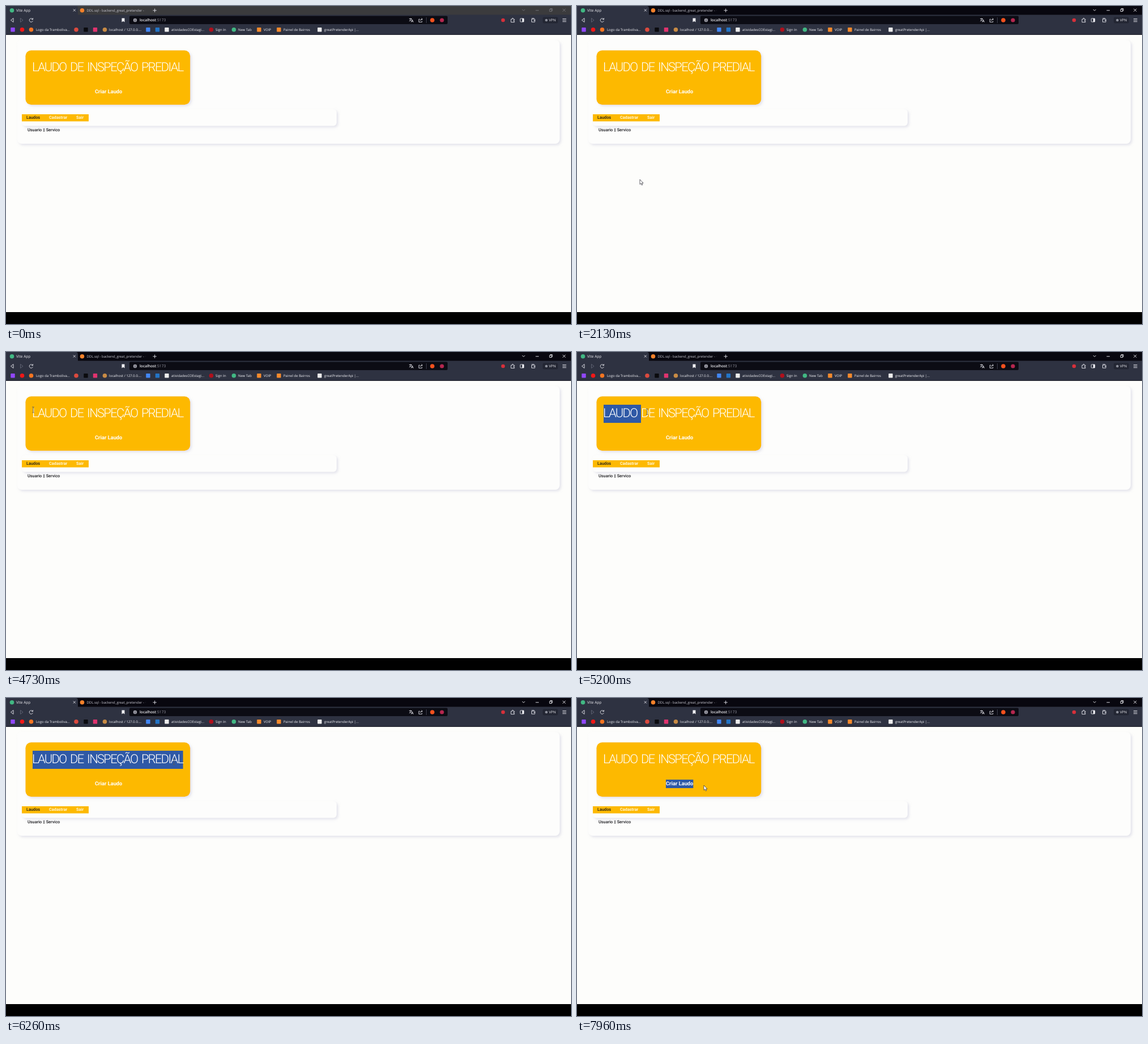
These frames come from a looping animation (998x561 px, 8000 ms). An HTML page:

```html
<!DOCTYPE html>
<html lang="pt">
<head>
<meta charset="utf-8">
<title>Vite App</title>
<style>
  html, body { margin: 0; width: 100%; height: 100%; overflow: hidden; background: #fdfdfb; }
  svg { display: block; width: 100vw; height: 100vh; }
  text { white-space: pre; text-rendering: geometricPrecision; }
  .ui { font-family: "Open Sans", "Noto Sans", sans-serif; font-size: 6px; fill: #f1f1f5; }
  .page { font-family: Roboto, "Noto Sans", sans-serif; font-size: 7.35px; fill: #17171b; font-weight: 500; }
  .page .title { font-size: 22px; font-weight: 300; letter-spacing: -1.75px; word-spacing: 3px; fill: #fff; }
  .page .create { font-size: 9.3px; font-weight: 600; fill: #fff; }
  .page .light { fill: #fff6dc; font-weight: 600; }
  .line { fill: none; stroke: #e6e6ec; stroke-width: .9; }
</style>
</head>
<body>
<svg viewBox="0 0 998 561" preserveAspectRatio="none">
  <defs>
    <filter id="soft" x="-10%" y="-20%" width="120%" height="150%">
      <feDropShadow dx="2.5" dy="2.5" stdDeviation="2" flood-color="#c9c9dc" flood-opacity=".5"/>
    </filter>
  </defs>

  <rect width="998" height="561" fill="#fdfdfb"/>

  <g class="page">
    <rect x="20" y="60" width="958" height="183" rx="8" fill="#fdfdfc" filter="url(#soft)"/>
    <rect x="34.4" y="78.3" width="291" height="96" rx="10" fill="#fdb902" filter="url(#soft)"/>
    <rect x="28" y="182" width="556" height="29.5" rx="6" fill="#fdfdfc" filter="url(#soft)"/>
    <rect x="28" y="191" width="118" height="12.5" fill="#fdb902"/>
    <rect id="selTitle" x="47" y="93" height="32" fill="#2f59a6"/>
    <rect id="selCreate" x="157" y="144" height="15" fill="#2f59a6"/>
    <text id="title" class="title" x="46" y="114.5">LAUDO DE INSPEÇÃO PREDIAL</text>
    <text id="create" class="create" x="157" y="154.3">Criar Laudo</text>
    <text x="36" y="199.4">Laudos</text>
    <text class="light" x="76" y="199.4">Cadastrar</text>
    <text class="light" x="124" y="199.4">Sair</text>
    <text x="38" y="221">Usuario <tspan font-weight="700">||</tspan> Servico</text>
  </g>

  <g class="ui">
    <rect id="strip" width="998" height="16"/>
    <path d="M0 0H123Q127 0 127 4V16H0Z" fill="#2e3241"/>
    <rect y="15.5" width="998" height="35.5" fill="#2e3241"/>
    <rect y="50" width="998" height="1" fill="#1b1d27"/>
    <rect x="218" y="17.5" width="562" height="14.5" rx="2" fill="#0c0c14"/>

    <text x="18" y="10" font-size="6.5">Vite App</text>
    <text x="142.5" y="10" fill="#c9c9d2">DDL.sql - backend_great_pretender - <tspan fill="#55555f">·</tspan></text>
    <path class="line" d="M118.8 5.5l4 4m0-4l-4 4M259.5 7.8h6.4m-3.2-3.2v6.4"/>

    <path class="line" d="M13 21.5L8.5 25l4.5 3.5Z"/>
    <path class="line" d="M25.5 21.5L30 25l-4.5 3.5Z" style="stroke:#626676"/>
    <path class="line" d="M47 23.2A3.2 3.2 0 1 0 47.4 26.3M47.6 21.3v2.4h-2.5"/>
    <path d="M204.5 21.5h5v7l-2.5-1.8-2.5 1.8Z" fill="#f1f1f5"/>
    <circle cx="228" cy="25" r="3.2" fill="#9c9ca6"/>
    <path d="M228 23v.9m0 .7v2.3" stroke="#22222c" stroke-width=".9"/>
    <text x="236" y="27.3" font-size="6.7" font-weight="600">localhost<tspan fill="#9a9aa5" font-weight="400">:5173</tspan></text>

    <path class="line" d="M712 22.5h5m-2.5-1v1m1.8 0q-1 3-4 4.3m1-2.6q1 1.6 2 2M715.8 28.5l1.8-4.5 1.8 4.5m-3-1.4h2.4"/>
    <path class="line" d="M731 23.3h-1.8v5h5.6v-1.8M731.5 26q.3-2.7 3.8-2.8m-1.5-1.7l1.7 1.7-1.7 1.7"/>
    <path d="M742.5 20v10" stroke="#4a4c5a" stroke-width=".8"/>
    <circle cx="753" cy="25" r="3.8" fill="#f4511e"/>
    <circle cx="770" cy="25" r="3.6" fill="#b5274f"/>

    <circle cx="878" cy="25" r="3.3" fill="#d6303a"/>
    <path class="line" d="M892 23.3h2q-.4-2 1-2t1 2h2v1.9q-1.6-.3-1.6.8t1.6.8v1.8h-6Z"/>
    <rect class="line" x="908.3" y="22" width="6.4" height="6" rx=".8"/>
    <rect x="911.8" y="22" width="2.9" height="6" fill="#f1f1f5"/>
    <path class="line" d="M928.5 23h5.6v5.2h-5.6Zm0-1.2h4.5M932 25.5h3"/>
    <rect x="948" y="19.5" width="27" height="11" rx="3" fill="#232633"/>
    <circle cx="954.5" cy="25" r="2.3" fill="#8d909c"/>
    <text x="959" y="27.3" font-size="6.2">VPN</text>
    <path class="line" d="M983 22.6h6.6m-6.6 2.5h6.6m-6.6 2.5h6.6"/>

    <path id="controls" class="line" d="M911.8 6l2.4 2.4 2.4-2.4M935.5 7.8h5.6M960.2 5.8h3.6v3.8h-3.6Zm1.2 0v-1.2h3.6v3.8h-1.2M983.3 4.8l5 5m0-5l-5 5"/>
    <g id="marks"></g>
  </g>

  <rect y="540" width="998" height="21" fill="#000"/>

  <path id="arrow" d="M0 0V8.6L2 6.9 3.4 10 4.8 9.4 3.5 6.4H6.1Z" fill="#fff" stroke="#30303a" stroke-width=".75"/>
  <path id="beam" d="M-1.8-5H-.4L0-4.6.4-5H1.8M0-4.6V4.6M-1.8 5H-.4L0 4.6.4 5H1.8" fill="none" stroke="#55585f" stroke-width=".9"/>
</svg>

<script>
const LOOP = 8000;
const FOCUS = 930;   // the window becomes active
const ENTER = 960;   // the pointer comes in
const $ = id => document.getElementById(id);
const NS = 'http://www.w3.org/2000/svg';

function add(tag, attrs, text = '') {
  const el = document.createElementNS(NS, tag);
  for (const key in attrs) el.setAttribute(key, attrs[key]);
  el.textContent = text;
  $('marks').append(el);
}

function addIcon(x, y, shape, fill) {
  if (shape === 'circle') add('circle', { cx: x, cy: y, r: 3.8, fill });
  else add('rect', { x: x - 3.7, y: y - 3.7, width: 7.4, height: 7.4, rx: .8, fill });
}

// Bookmarks: icon centre, shape, colour, label, label x
[
  [12, 'square', '#9147ff'],
  [28.5, 'circle', '#f01818'],
  [44.5, 'circle', '#f47521', 'Logo da Tramboliva...', 53],
  [124, 'circle', '#db4a3e'],
  [141, 'square', '#0b0b0e'],
  [157.5, 'square', '#e0336e'],
  [174.5, 'circle', '#c88b45', 'localhost / 127.0.0....', 182],
  [251, 'square', '#4287f5'],
  [267.5, 'square', '#2374c6'],
  [284, 'square', '#ececec', 'atividadesCOEstagi...', 292],
  [362.5, 'circle', '#b0101c', 'Sign In', 370],
  [402.5, 'circle', '#41b883', 'New Tab', 410],
  [447, 'square', '#f58a2c', 'VOIP', 455],
  [482, 'square', '#f58a2c', 'Painel de Bairros', 490],
  [554, 'square', '#ececec', 'greatPretenderApi |...', 562],
].forEach(([x, shape, fill, label, labelX]) => {
  addIcon(x, 41.8, shape, fill);
  if (label) add('text', { x: labelX, y: 44 }, label);
});
addIcon(10.5, 7.8, 'circle', '#41b883');
addIcon(134.5, 7.8, 'circle', '#f5812a');

// Pointer path: time, x, y
const path = [
  [960, -8, 230], [1500, 95, 300], [1730, 109, 307], [2130, 111, 306], [2300, 111, 306],
  [2750, 62, 190], [3100, 60, 106], [3330, 61, 105], [3440, 69, 106], [3530, 59, 106],
  [3730, 59, 106], [4060, 43, 101], [4230, 43, 101], [4500, 38, 108], [4730, 48, 102],
  [4850, 49, 103], [5030, 80, 105], [5600, 283, 107], [5860, 306, 106], [6000, 317, 107],
  [6150, 317, 107], [6660, 150, 152], [6860, 152, 149], [7000, 154, 151], [7530, 190, 151],
  [7720, 214, 169], [7840, 229, 160], [7960, 224, 154],
];

function pointerAt(t) {
  const next = path.findIndex(k => k[0] > t);
  if (next < 0) return path[path.length - 1].slice(1);
  if (next === 0) return path[0].slice(1);
  const a = path[next - 1], b = path[next];
  const u = (t - a[0]) / (b[0] - a[0]);
  const e = u * u * (3 - 2 * u);
  return [a[1] + (b[1] - a[1]) * e, a[2] + (b[2] - a[2]) * e];
}

// Selection grows letter by letter as the pointer, a little ahead, passes each letter's middle
function select(bar, label, x, active) {
  const left = +bar.getAttribute('x');
  let end = left;
  if (active) {
    for (let i = 0; i < label.getNumberOfChars(); i++) {
      const from = label.getStartPositionOfChar(i).x;
      const to = label.getEndPositionOfChar(i).x;
      if ((from + to) / 2 > x - 7) break;
      end = to;
    }
  }
  bar.setAttribute('width', Math.max(0, end - left));
}

const inside = (x, y, l, t, r, b) => x >= l && x <= r && y >= t && y <= b;

function draw(t) {
  const [x, y] = pointerAt(t);
  const onText = inside(x, y, 47, 93, 314, 125) || inside(x, y, 157, 144, 204, 159);
  const place = `translate(${x.toFixed(2)} ${y.toFixed(2)})`;
  for (const [id, on] of [['arrow', !onText], ['beam', onText]]) {
    $(id).setAttribute('transform', place);
    $(id).style.display = on && t >= ENTER ? '' : 'none';
  }
  const focused = t >= FOCUS;
  $('strip').style.fill = focused ? '#08070f' : '#3b3b3d';
  $('controls').style.stroke = focused ? '#f1f1f5' : '#77777d';
  select($('selTitle'), $('title'), t < 6000 ? x : 999, t > 4850 && t < 6750);
  select($('selCreate'), $('create'), t < 7600 ? x : 999, t > 7000);
}

const start = performance.now();
function tick() {
  draw((performance.now() - start) % LOOP);
  requestAnimationFrame(tick);
}
tick();
</script>
</body>
</html>
```
